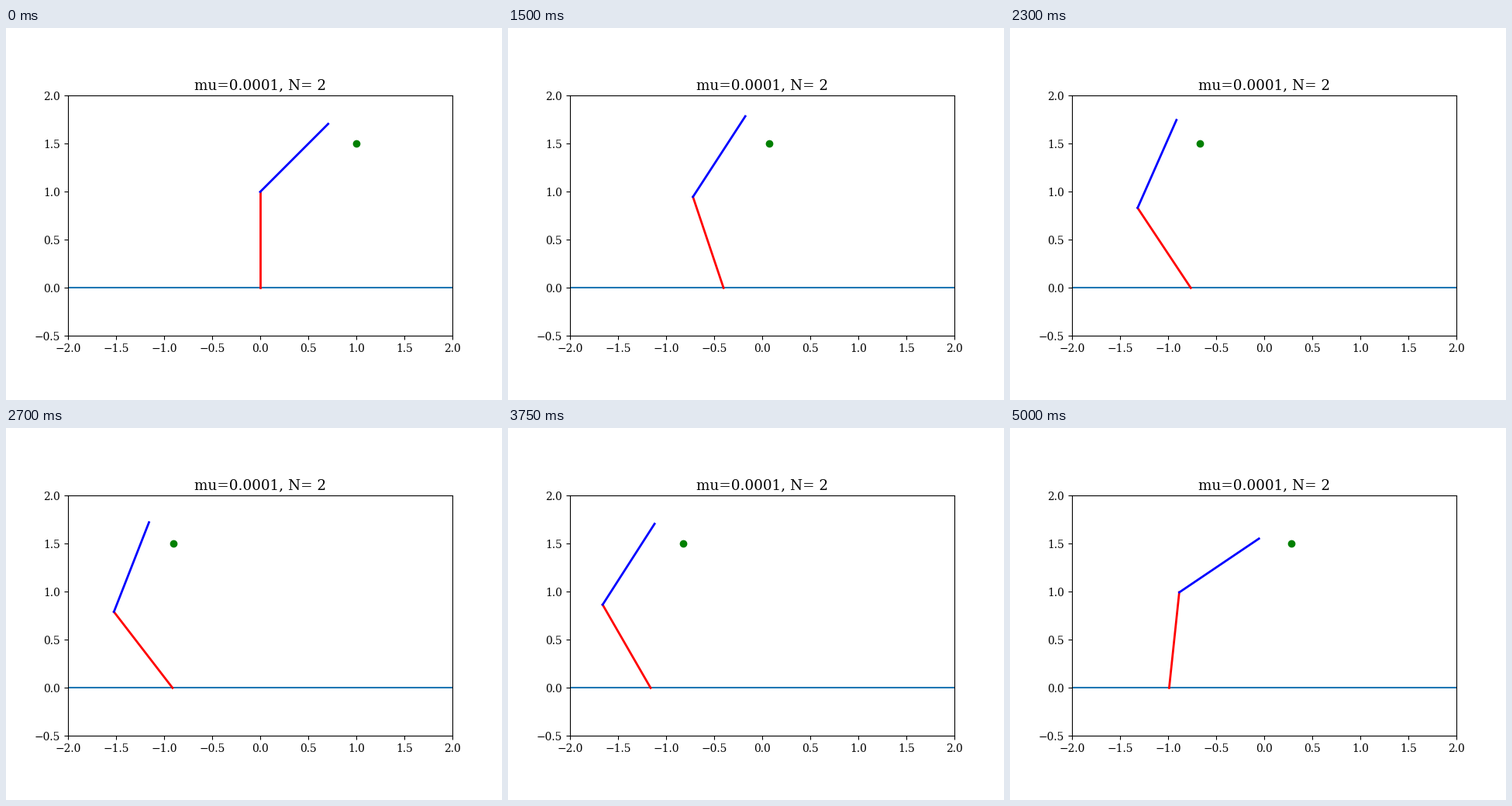
Animation, 640 px wide and 480 px high, one loop 5.05 s. Source, as a matplotlib script:

```python
import numpy as np
import matplotlib.pyplot as plt
from matplotlib.animation import FuncAnimation

FRAMES, STEP = 101, 0.05
KEYS = np.array([0.5, 1, 2, 3, 4, 5])  # seconds
plt.rcParams["font.family"] = "DejaVu Serif"


def glide(*shifts):
    """Smooth motion t^2 * p(t): starts at rest, passes the shifts at KEYS."""
    p = np.polyfit(KEYS, shifts / KEYS**2, len(KEYS) - 1)
    return lambda t: t * t * np.polyval(p, t)


base_x = glide(-0.036, -0.181, -0.636, -1.005, -1.179, -0.989)
elbow_x = glide(-0.069, -0.331, -1.116, -1.623, -1.595, -0.884)
turn = glide(0.034, 0.110, 0.315, 0.408, 0.096, -0.192)

fig, ax = plt.subplots(figsize=(6.4, 4.8), dpi=100)
ax.set_aspect("equal")
ax.set(xlim=(-2, 2), ylim=(-0.5, 2))
ax.set_title("mu=0.0001, N= 2", fontsize=13.2)
ax.axhline(0)
lower, = ax.plot([], [], color="red", lw=2)
upper, = ax.plot([], [], color="blue", lw=2)
target, = ax.plot([], [], "o", color="green")


def draw(i):
    t = i * STEP
    base, ex = base_x(t), elbow_x(t)
    ey = np.sqrt(1 - (ex - base) ** 2)  # both links have length 1
    angle = np.pi / 4 + turn(t)
    lower.set_data([base, ex], [0, ey])
    upper.set_data([ex, ex + np.cos(angle)], [ey, ey + np.sin(angle)])
    target.set_data([np.cos(t)], [1.5])
    return lower, upper, target


anim = FuncAnimation(fig, draw, frames=FRAMES, interval=1000 * STEP, repeat=True)
plt.show()
```
